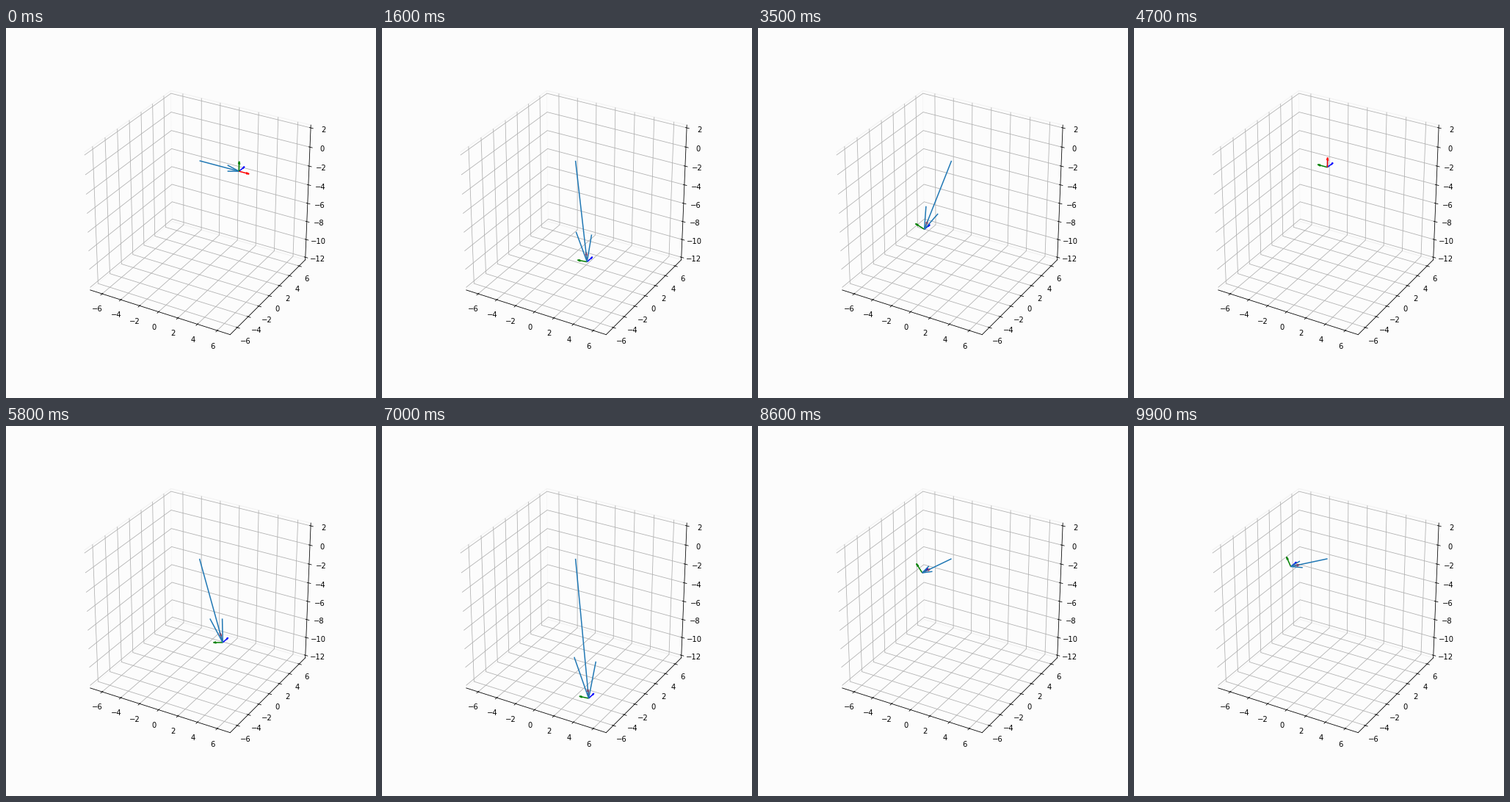
A matplotlib script for the animation above (10 s loop, 504 px wide and 504 px high).

```python
import numpy as np
import matplotlib.pyplot as plt
from matplotlib.animation import FuncAnimation

# Elastic pendulum swinging in the x-z plane
K, REST, G = 2.0, 3.0, 9.81
FRAMES, SUBSTEPS = 100, 40
PAPER = "#fcfcfc"


def deriv(s):
    pos, vel = s[:2], s[2:]
    pull = -K * (1 - REST / np.hypot(*pos)) * pos
    return np.concatenate([vel, pull - [0, G]])


def rk4(s, h):
    k1 = deriv(s)
    k2 = deriv(s + h / 2 * k1)
    k3 = deriv(s + h / 2 * k2)
    k4 = deriv(s + h * k3)
    return s + h / 6 * (k1 + 2 * k2 + 2 * k3 + k4)


def simulate():
    times = np.linspace(0, 10, FRAMES)
    h = (times[1] - times[0]) / SUBSTEPS
    s = np.array([4.0, 0.0, 0.0, 0.0])
    path = [s[:2]]
    for _ in times[1:]:
        for _ in range(SUBSTEPS):
            s = rk4(s, h)
        path.append(s[:2])
    return np.array(path)


def body_axes(x, z):
    """Rotate the x axis towards the pivot; opposite vectors give no rotation."""
    c, s = -np.array([x, z]) / np.hypot(x, z)
    if abs(s) < 1e-9:
        c, s = 1, 0
    return (c, 0, s), (-s, 0, c), (0, 1, 0)


fig = plt.figure(figsize=(7, 7), dpi=72, facecolor=PAPER)
ax = fig.add_axes([0.125, 0.125, 0.775, 0.755], projection="3d",
                  facecolor=PAPER)
ax.apply_aspect = lambda position=None: None  # keep the axes non-square
ax.view_init(elev=30, azim=-60)
ax.set_box_aspect((1, 1, 1), zoom=np.sqrt(3) / 1.8294640721620434)

pad = 14 / 48
ax.set_xlim(-7 - pad, 7 + pad)
ax.set_ylim(-7 - pad, 7 + pad)
ax.set_zlim(-12 - pad, 2 + pad)
ax.set_xticks(range(-6, 7, 2))
ax.set_yticks(range(-6, 7, 2))
ax.set_zticks(range(-12, 3, 2))
for axis in (ax.xaxis, ax.yaxis, ax.zaxis):
    axis.set_pane_color(PAPER)
    axis.pane.set_edgecolor("#f2f2f2")

path = simulate()
arrows = []


def update(i):
    while arrows:
        arrows.pop().remove()
    x, z = path[i]
    arrows.append(ax.quiver(0, 0, 0, x, 0, z, color="C0"))
    for vec, color in zip(body_axes(x, z), "rgb"):
        arrows.append(ax.quiver(x, 0, z, *vec, color=color))
    return arrows


anim = FuncAnimation(fig, update, frames=FRAMES, interval=100,
                     init_func=lambda: [], repeat=True, repeat_delay=0)
plt.show()
```
